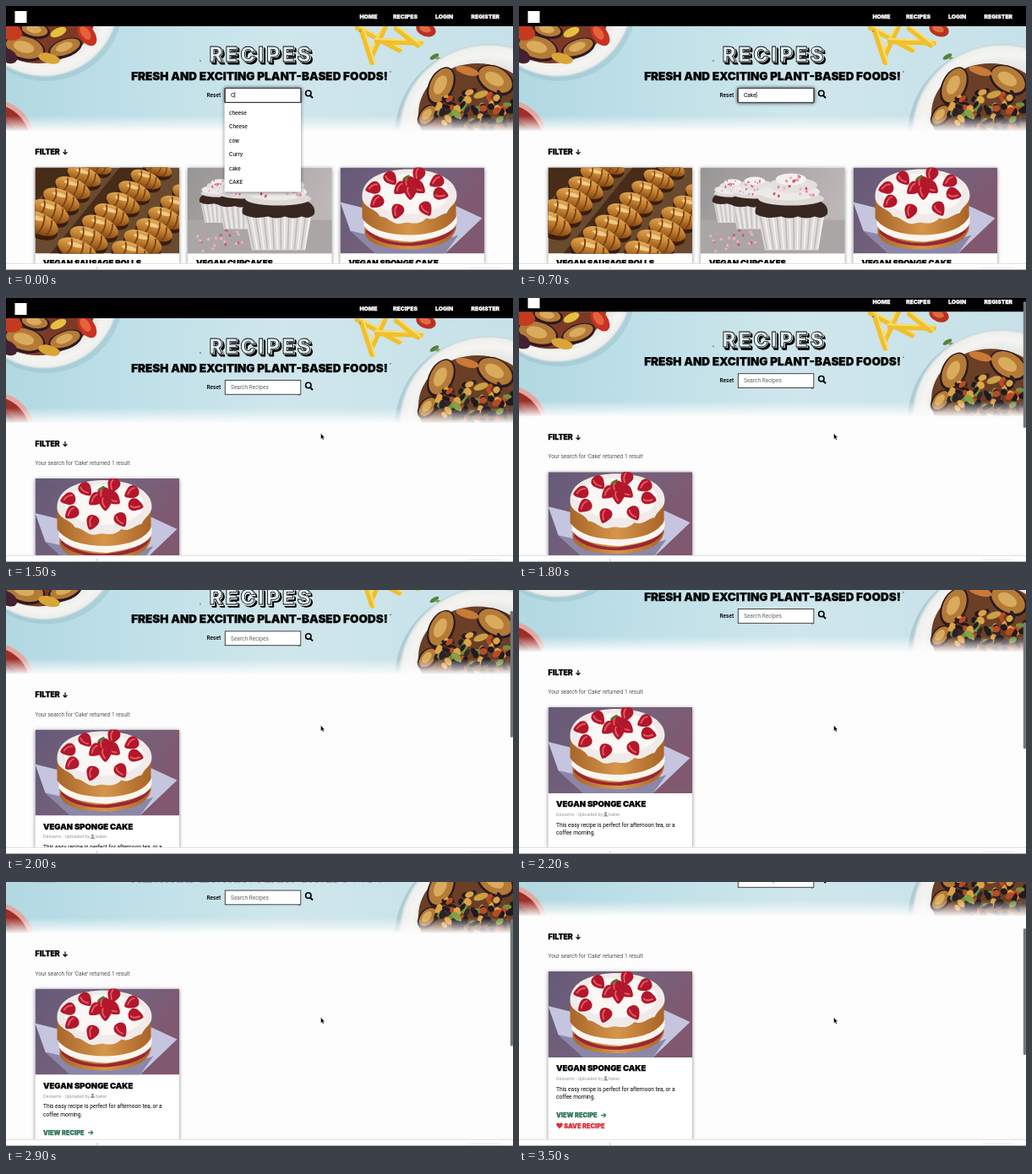
An HTML page for the animation above (3600 ms loop, 600 by 313 pixels).

```html
<!DOCTYPE html>
<html lang="en">
<head>
<meta charset="utf-8">
<title>Recipe search</title>
<style>
  html, body { margin: 0; width: 100%; height: 100%; overflow: hidden; background: #fdfdfd; }
  svg { display: block; width: 100vw; height: 100vh; }
  text { font-family: Roboto, Arial, sans-serif; font-size: 6.55px; }
  .big { font-family: Inter, sans-serif; font-weight: 900; stroke: currentColor; stroke-width: .25px; fill: currentColor; }
  .nav text { font-size: 6.8px; }
  .word { font: 800 24px Inter, sans-serif; letter-spacing: 3.1px; }
  .lead { font-size: 13.5px; }
  .filter { font-size: 8.8px; }
  .title { font-size: 9.5px; }
  .link { font-size: 7.4px; }
  .meta { font-size: 5.4px; }
  .menu { font: 500 6px Inter, sans-serif; }
  .card { fill: #fff; filter: drop-shadow(0 1px 2px #0007); }
  .line { fill: none; stroke: currentColor; stroke-width: 1.2; }
</style>
</head>
<body>
<svg viewBox="0 0 600 313" preserveAspectRatio="none">
  <defs>
    <linearGradient id="table">
      <stop offset="0" stop-color="#b2d8e2"/><stop offset=".25" stop-color="#bfe0e8"/>
      <stop offset=".55" stop-color="#cfe6ec"/><stop offset="1" stop-color="#c6e1e8"/>
    </linearGradient>
    <linearGradient id="fade" x2="0" y2="1">
      <stop offset="0" stop-color="#fdfdfd" stop-opacity="0"/><stop offset="1" stop-color="#fdfdfd"/>
    </linearGradient>
    <linearGradient id="wall" x2="1" y2=".3">
      <stop offset="0" stop-color="#989695"/><stop offset=".5" stop-color="#a9a5a4"/><stop offset="1" stop-color="#bdb8b7"/>
    </linearGradient>
    <linearGradient id="cloth" x2="1" y2=".4">
      <stop offset="0" stop-color="#665a78"/><stop offset=".6" stop-color="#76617c"/><stop offset="1" stop-color="#80586f"/>
    </linearGradient>
    <linearGradient id="crust" x2=".3" y2="1">
      <stop offset="0" stop-color="#e8b768"/><stop offset=".5" stop-color="#c88734"/><stop offset="1" stop-color="#8a4d16"/>
    </linearGradient>
    <linearGradient id="sponge">
      <stop offset="0" stop-color="#a8662a"/><stop offset=".5" stop-color="#d6964a"/><stop offset="1" stop-color="#a86427"/>
    </linearGradient>
    <radialGradient id="plate">
      <stop offset=".7" stop-color="#dfe2e1"/><stop offset=".88" stop-color="#f5f4f1"/>
      <stop offset=".97" stop-color="#eef0ee"/><stop offset="1" stop-color="#c4d2d5"/>
    </radialGradient>
    <clipPath id="heroBox"><path d="M0 24H600V148H0z"/></clipPath>
    <clipPath id="photoBox"><path d="M0 0H170.5V102H0z"/></clipPath>
    <g id="rolls" clip-path="url(#photoBox)"><path fill="#6a4a2e" d="M0 0H171V102H0z"/></g>
    <g id="cupcakes" clip-path="url(#photoBox)"><path fill="url(#wall)" d="M0 0H171V102H0z"/></g>
    <g id="cake" clip-path="url(#photoBox)">
      <path fill="url(#cloth)" d="M0 0H171V102H0z"/>
      <path fill="#c5c5df" d="M0 41L28 48 138 46 168 60 124 102H42L12 75z"/>
      <path fill="#8c86a8" d="M42 102L12 75 34 80 90 97 140 80 124 102z"/>
      <path fill="url(#sponge)" d="M29 62V78Q35 98 85 97 132 95 137 72V55z"/>
      <path fill="#9c2632" d="M31 72Q50 91 85 89 130 84 136 66V71Q130 89 85 93 45 93 31 77z"/>
      <path fill="#faf6ef" d="M28 61Q40 80 85 80 128 78 138 57V64Q137 81 85 88 38 86 28 69z"/>
      <path fill="url(#sponge)" d="M26 35V60Q38 79 85 78 130 76 137 55V34z"/>
      <path fill="#f0ebe8" d="M26 34C26 12 52 2 82 2S138 14 138 33C138 43 130 45 126 54 118 55 112 64 102 60 91 71 82 63 74 66 63 70 57 58 47 58 43 48 26 49 26 34z"/>
      <ellipse cx="82" cy="31" rx="47" ry="24" fill="#faf7f5"/>
    </g>
    <path id="berry" d="M0-6C5-6 7-2 5 2 3 6 1 8 0 8S-3 6-5 2C-7-2-5-6 0-6z"/>
    <path id="arrow" class="line" d="M0 0H5.6M3.2-2.5L5.7 0 3.2 2.5"/>
  </defs>

  <g id="page">
    <path fill="#fdfdfd" d="M0 0H600V460H0z"/>
    <g id="hero" clip-path="url(#heroBox)"><path fill="url(#table)" d="M0 24H600V148H0z"/></g>
    <path fill="url(#fade)" d="M0 130H600V149H0z"/>
    <path d="M0 0H600V24H0z"/>
    <rect x="10.5" y="6" width="14" height="14" fill="#fff"/>
    <g class="nav" color="#fff">
      <text class="big" x="418.5" y="14.6">HOME</text>
      <text class="big" x="458" y="14.6">RECIPES</text>
      <text class="big" x="508" y="14.6">LOGIN</text>
      <text class="big" x="550.5" y="14.6">REGISTER</text>
    </g>
    <g id="heading"></g>
    <text class="big lead" x="300" y="87.5" text-anchor="middle">FRESH AND EXCITING PLANT-BASED FOODS!</text>
    <text x="237.5" y="108" font-weight="500">Reset</text>
    <rect id="focus" x="258.5" y="97" width="91" height="18" rx="1.5" fill="#333" style="filter:drop-shadow(0 0 2px #234)"/>
    <rect x="259.3" y="97.5" width="89.5" height="16.8" fill="#fff" stroke="#333" stroke-width=".9"/>
    <text id="query" x="266" y="108.3"></text>
    <path id="caret" stroke="#000" stroke-width=".7"/>
    <g fill="none" stroke="#000"><circle cx="357.8" cy="103.5" r="3.2" stroke-width="1.6"/><path d="M360 106L363 109" stroke-width="2"/></g>
    <text class="big filter" x="34.5" y="175.8">FILTER</text>
    <use href="#arrow" transform="translate(70 170) rotate(90)"/>

    <g id="list">
      <path class="card" d="M34.5 191.5h170.5v150h-170.5zM215 191.5h170.5v150h-170.5zM395.5 191.5h170.5v150h-170.5z"/>
      <use href="#rolls" x="34.5" y="191.5"/>
      <use href="#cupcakes" x="215" y="191.5"/>
      <use href="#cake" x="395.5" y="191.5"/>
      <text class="big title" x="44" y="307.5">VEGAN SAUSAGE ROLLS</text>
      <text class="big title" x="225" y="307.5">VEGAN CUPCAKES</text>
      <text class="big title" x="405.5" y="307.5">VEGAN SPONGE CAKE</text>
    </g>

    <g id="result">
      <text x="34.5" y="198.3" fill="#555">Your search for 'Cake' returned 1 result</text>
      <path class="card" d="M34.5 214h170.5v226h-170.5z"/>
      <use href="#cake" x="34.5" y="214"/>
      <text class="big title" x="44" y="332.3">VEGAN SPONGE CAKE</text>
      <g fill="#999">
        <text class="meta" x="44" y="343">Desserts - Uploaded by</text>
        <circle cx="102.5" cy="339.6" r="1.5"/><path d="M100 343.5Q100 341 102.5 341T105 343.5z"/>
        <text class="meta" x="106" y="343">baker</text>
      </g>
      <text x="44" y="355.8">This easy recipe is perfect for afternoon tea, or a</text>
      <text x="44" y="365.3">coffee morning.</text>
      <g color="#2c7355">
        <text class="big link" x="44" y="387.3">VIEW RECIPE</text>
        <use href="#arrow" x="97" y="384.6"/>
      </g>
      <g color="#dc2c36">
        <path fill="currentColor" d="M48 400.5L44.8 397C43 394.5 46 392 48 394.7 50 392 53 394.5 51.2 397z"/>
        <text class="big link" x="53.2" y="399.8">SAVE RECIPE</text>
      </g>
    </g>
    <g id="menu"></g>
  </g>

  <rect id="bar" x="596.8" width="3.2" height="150" rx="1.5" fill="#777"/>
  <path id="pointer" d="M372.5 160.5v6.8l1.5-1.3 1.1 2.3 1.2-.5-1-2.3h2z" stroke="#fff" stroke-width=".4"/>
  <path fill="#fff" d="M0 305H600V313H0z"/>
  <path fill="#d8d8d8" d="M0 305H600V305.8H0z"/>
  <path fill="#b4b4b4" d="M0 312H600V313H0zM107.5 309h.8v3h-.8z"/>
  <path fill="#f4f4f4" d="M548 309h37v2.5h-37z"/>
</svg>
<script>
const $ = id => document.getElementById(id);
const add = (id, markup) => $(id).insertAdjacentHTML('beforeend', markup);
let seed = 11;
const rnd = (a, b) => a + (b - a) * (seed = seed * 16807 % 2147483647) / 2147483647;
const pick = list => list[Math.floor(rnd(0, list.length))];
const oval = (x, y, rx, ry, fill, turn = 0) =>
  `<ellipse rx="${rx}" ry="${ry}" fill="${fill}" transform="translate(${x} ${y}) rotate(${turn})"/>`;
const path = (d, fill) => `<path d="${d}" fill="${fill}"/>`;
const slice = (x, y, rx, ry, turn) => oval(x, y, rx, ry, '#2d1a20', turn) +
  oval(x, y - 1, rx - 2.5, ry - 2.2, '#b47a37', turn) + oval(x - 1, y - 1.5, rx * .5, ry * .45, '#d9ab5c', turn);

function drawHero() {
  let art = oval(47, 0, 91, 89, '#8fb8c466') + oval(45, -5, 89, 89, 'url(#plate)') + oval(38, 8, 68, 60, '#7c3a26');
  art += slice(22, 50, 25, 15, 15) + slice(70, 50, 21, 11, -20) + slice(34, 29, 18, 10, 10);
  art += oval(96, 34, 15, 9, '#c8321f', 55) + oval(94, 32, 9, 5, '#e4633c', 55) + oval(7, 32, 12, 9, '#c43b20') +
    oval(51, 62, 13, 6, '#d9a536', 15) + oval(62, 31, 10, 5, '#e3c13f', -25) + oval(2, 59, 12, 8, '#432130', 30);
  art += oval(-16, 161, 50, 50, '#e2a7a0') + oval(-18, 163, 47, 47, '#9c2f28') + oval(-20, 170, 40, 40, '#6e1f1d');

  for (const [x, y, w, turn] of [[415, 21, 62, 28], [428, 60, 65, -65], [436, 38, 58, 2], [424, 26, 45, 72], [462, 22, 38, 38]])
    art += `<g transform="translate(${x} ${y}) rotate(${turn})"><rect width="${w}" height="7" rx="3" fill="#efc02e"/>` +
      `<rect width="${w}" height="2" rx="1" fill="#fbdf74"/></g>`;
  art += oval(497, 28, 12, 8, '#b8321f', 20) + oval(496, 27, 7, 4, '#df6a43', 20) +
    oval(507, 60, 6, 2.5, '#55803a', -30) + oval(513, 63, 5, 2, '#76a150', 25);

  art += oval(568, 153, 108, 106, '#7fa9b566') + oval(571, 149, 106, 104, 'url(#plate)') + oval(558, 128, 70, 60, '#6b3f26');
  art += slice(515, 95, 24, 15, -65) + slice(579, 88, 24, 16, 30) + slice(499, 130, 15, 10, -50);
  for (let i = 0; i < 90; i++) {
    const a = rnd(0, 6.3), d = Math.sqrt(rnd(0, 1));
    art += oval(557 + 48 * d * Math.cos(a), 125 + 25 * d * Math.sin(a), rnd(3, 6), rnd(2.2, 4),
      pick(['#201a20', '#29212a', '#352629', '#201a20', '#73903c', '#b94b22', '#dda447']), rnd(0, 180));
  }
  art += oval(546, 77, 14, 5, '#c87a36', 15) + oval(562, 105, 9, 4, '#c9a144', -20) + oval(533, 128, 7, 4, '#83a145', 40);
  for (const [x, y] of [[218, 84], [230, 65], [347, 115], [419, 30], [455, 78]])
    art += oval(x, y, 1.2, .7, '#5d7f79', x);
  add('hero', art);
}

// Outlined letters, a pale gap, then a solid shadow.
function drawHeading() {
  const pale = '#e2f0f4';
  const word = (shift, fill, stroke, width) => `<text class="word" x="${240.5 + shift}" y="${66 + shift}"
    fill="${fill}" stroke="${stroke}" stroke-width="${width}">RECIPES</text>`;
  for (const shift of [3, 2.4, 1.8, 1.2]) add('heading', word(shift, '#000', '#000', .8));
  add('heading', word(.3, pale, pale, 2) + word(0, pale, '#000', .8));
}

function drawRolls() {
  let art = path('M0 0H50L0 40zM100 0H132L55 102H18z', '#472c19');
  for (const [x0, y0, n] of [[4, 66, 6], [50, 98, 7], [114, 102, 7]])
    for (let i = n; i >= 0; i--) {
      const k = 1.18 - i * .045, x = x0 + i * 13.5, y = y0 - i * 14;
      art += `<g transform="translate(${x} ${y}) rotate(24) scale(${k})">` + oval(1, 4, 21, 11, '#3b1d0c') +
        oval(0, 0, 21, 10.5, 'url(#crust)') + oval(-4, -4, 8, 2.2, '#f0cb85', -8) +
        '<path d="M-10-8Q-4 0-9 8M2-10Q7 0 3 10M11-8Q15 0 12 8" fill="none" stroke="#7d3f14" stroke-width="1.6"/></g>';
    }
  add('rolls', art);
}

const sprinkle = (x, y) => oval(x, y, 1.9, 1.4, pick(['#d8506b', '#e98a9d', '#efb2bd']), rnd(0, 180));

function cupcake(x, y, k) {
  let art = `<g transform="translate(${x} ${y}) scale(${k})">` + path('M-40 6H40L32 50H-31z', '#dedad9');
  for (let i = -37; i < 40; i += 5)
    art += `<path d="M${i} 7L${i * .8 + 1} 49" stroke="${i % 2 ? '#bdb7b7' : '#f6f4f3'}" stroke-width="1.5"/>`;
  art += path('M-42 7C-45-9-25-13 0-13S46-9 43 7Q37 14 28 10 18 14 8 10-2 14-12 10-30 14-42 7z', '#382621');
  art += oval(0, -11, 39, 8, '#dcd9d7') + oval(-2, -19, 36, 10, '#ece9e7') + oval(2, -27, 29, 9, '#e3e0de') + oval(0, -34, 18, 7, '#f3f1ef');
  for (let i = 0; i < 20; i++) {
    const h = rnd(0, 1), w = 34 - 22 * h;
    art += sprinkle(rnd(-w, w), -10 - 28 * h);
  }
  return art + '</g>';
}

function drawCupcakes() {
  let art = path('M0 62H171V102H0z', '#aaa6a6');
  for (let i = 0; i < 22; i++) art += sprinkle(rnd(2, 65), rnd(70, 100));
  add('cupcakes', art + cupcake(38, 37, .57) + cupcake(64, 39, .68) + cupcake(107, 48, 1));
}

function drawBerries() {
  const red = (x, y, turn, k) => `<g transform="translate(${x} ${y}) rotate(${turn}) scale(${k})">
    <use href="#berry" fill="#b3172b"/><path d="M-2-4Q-4 0 0 5" stroke="#e55a62" fill="none" stroke-width="1.4"/></g>`;
  let art = '';
  for (const [x, y, turn] of [[40, 24, 75], [59, 12, -40], [93, 7, 20], [115, 16, 60], [118, 31, -75], [101, 48, -30], [68, 51, 20], [44, 40, 50]])
    art += red(x, y, turn, 1.3);
  for (const [x, y, turn] of [[72, 24, 50], [92, 23, -50], [81, 18, 10], [83, 28, 0]]) art += red(x, y, turn, 1.3);
  add('cake', art + oval(78, 12, 5, 1.6, '#55782f', -35));
}

drawHero();
drawHeading();
drawRolls();
drawCupcakes();
drawBerries();

const options = ['cheese', 'Cheese', 'cow', 'Curry', 'cake', 'CAKE'];
function menuMarkup(typed) {
  const hits = options.filter(o => o.toLowerCase().startsWith(typed.toLowerCase()));
  return `<rect class="card" x="258.5" y="115" width="90.5" height="${7 + 16.4 * hits.length}"/>` +
    hits.map((o, i) => `<text class="menu" x="264" y="${129 + i * 16.4}">${o}</text>`).join('');
}

const ease = (t, a, b) => {
  const u = Math.min(1, Math.max(0, (t - a) / (b - a)));
  return u * u * (3 - 2 * u);
};
const show = (id, on) => $(id).style.display = on ? '' : 'none';

let last = -1;
function draw(now) {
  requestAnimationFrame(draw);
  const t = Math.floor(now % 3600 / 100) * 100;  // ten steps a second
  if (t === last) return;
  last = t;

  const found = t >= 900;
  const typed = 'Cake'.slice(0, t < 200 ? 1 : t < 400 ? 2 : t < 500 ? 3 : 4);
  $('query').textContent = found ? 'Search Recipes' : typed;
  $('query').setAttribute('fill', found ? '#666' : '#000');
  $('caret').setAttribute('d', `M${266.5 + $('query').getComputedTextLength()} 102v7`);
  $('menu').innerHTML = t < 600 ? menuMarkup(typed) : '';
  show('caret', !found);
  show('focus', !found);
  show('list', !found);
  show('result', found);

  const scroll = 75 * ease(t, 1700, 2200) + 3 * ease(t, 2200, 2500) + 30 * ease(t, 2600, 3400);
  $('page').setAttribute('transform', `translate(0 ${-scroll})`);
  $('bar').setAttribute('y', scroll * .51);
  show('bar', t >= 1700);
  show('pointer', t >= 1400);
}
requestAnimationFrame(draw);
</script>
</body>
</html>
```
